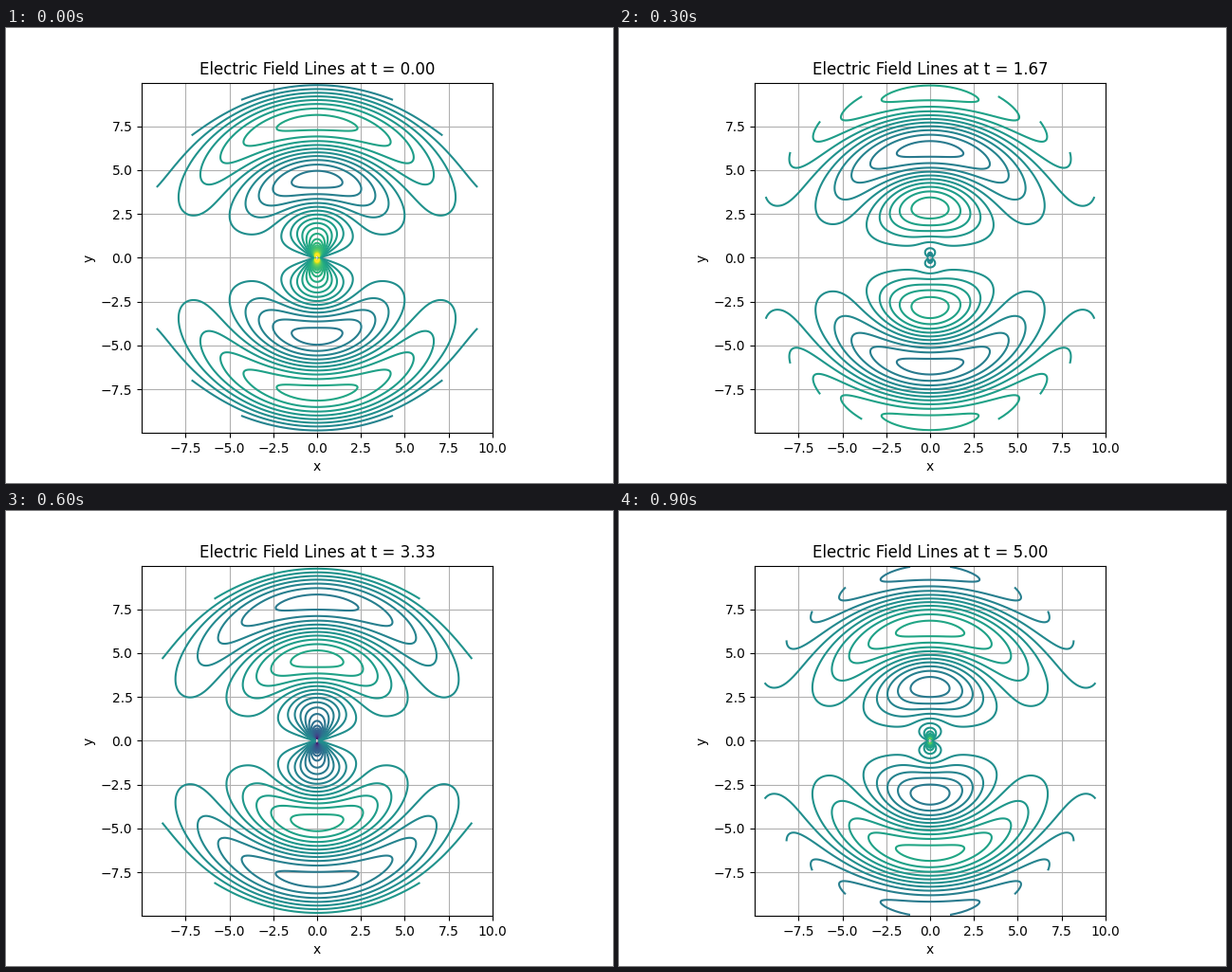
A matplotlib script that plays this animation: 640x480 px, repeating every 1 s.

```python
import numpy as np
import matplotlib.pyplot as plt
from matplotlib.animation import FuncAnimation

FRAMES = 10
INTERVAL = 100  # ms
TIMES = np.linspace(0, 5, FRAMES)
LEVELS = np.linspace(-5, 5, 50)

# Polar grid around a dipole lying along the x axis
r, theta = np.meshgrid(np.linspace(0.1, 10, 200), np.linspace(0, 2 * np.pi, 200))
X, Y = r * np.cos(theta), r * np.sin(theta)


def flux(t):
    """Flux function of an oscillating dipole; its contours are field lines."""
    phase = r - t
    return np.sin(theta) ** 2 * (np.cos(phase) / r + np.sin(phase))


fig, ax = plt.subplots(figsize=(6.4, 4.8), dpi=100)


def draw(frame):
    t = TIMES[frame]
    ax.clear()
    ax.contour(X, Y, flux(t), levels=LEVELS, cmap="viridis")
    ax.set_title(f"Electric Field Lines at t = {t:.2f}")
    ax.set_xlabel("x")
    ax.set_ylabel("y")
    ax.set_aspect("equal")
    ax.grid(True)
    return []


anim = FuncAnimation(fig, draw, frames=FRAMES, interval=INTERVAL,
                     init_func=lambda: [], repeat=True, repeat_delay=0)
plt.show()
```
